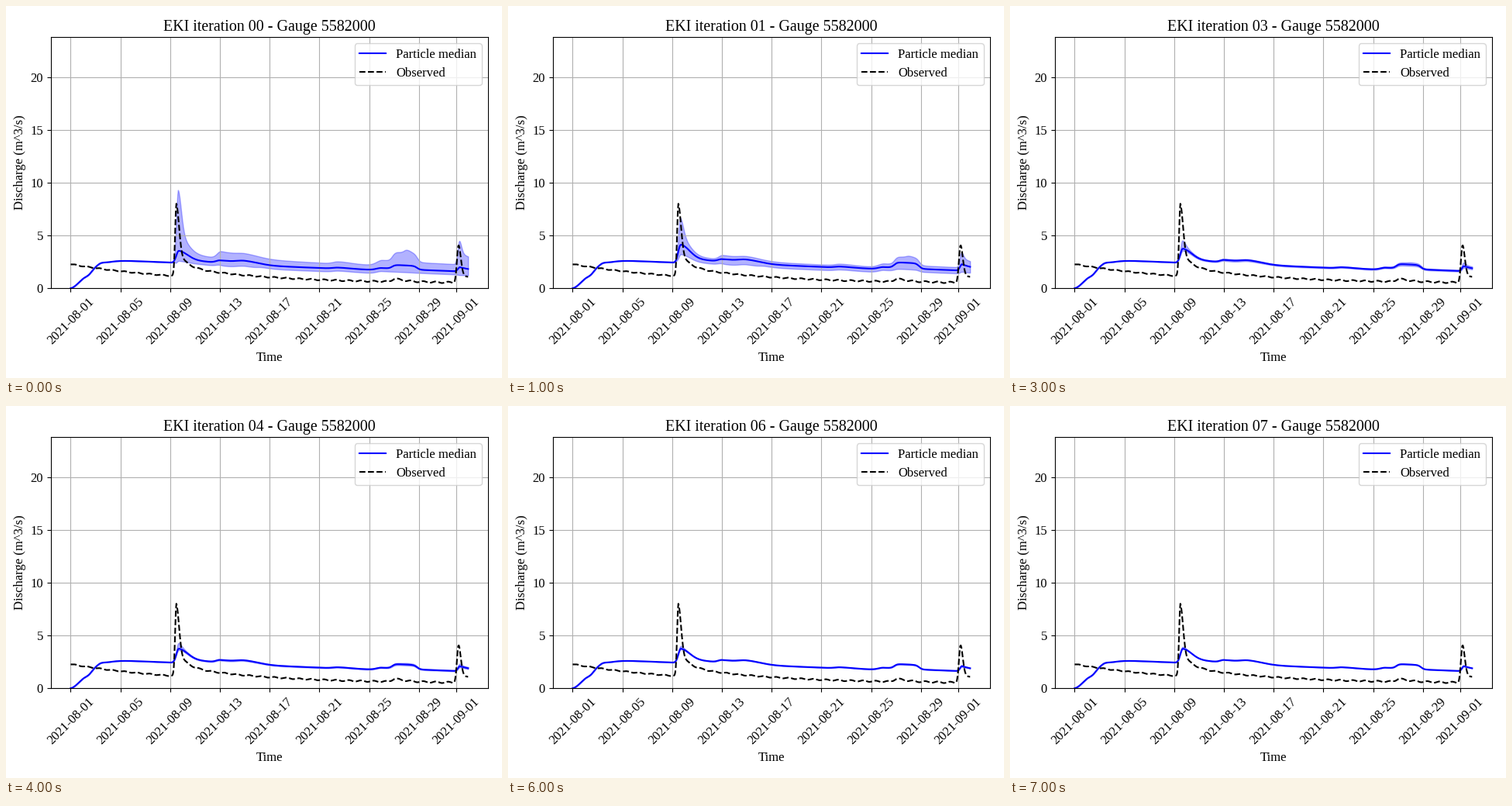
Animation, 640 px wide and 480 px high, one loop 8000 ms. Source, as a matplotlib script:

```python
import numpy as np
import matplotlib.pyplot as plt
from matplotlib.animation import FuncAnimation

plt.rcParams.update({"font.family": "Liberation Serif", "font.size": 12})

W, H, DPI = 640, 480, 100
LEFT, RIGHT, TOP, BOTTOM = 57.8, 621.9, 39.9, 364.1
STEPS = 8

t = np.arange(32 * 24) / 24  # hourly, in days


def bump(peak, rise, fall):
    """Bell with its own width on each side."""
    d = t - peak
    return np.exp(-0.5 * (d / np.where(d < 0, rise, fall)) ** 2)


def surge(peak, rise, decay):
    """Bell-shaped rise, exponential recession."""
    d = t - peak
    return np.where(d < 0, bump(peak, rise, 1), np.exp(-np.maximum(d, 0) / decay))


def plateau(start, end, width):
    return (np.tanh((t - start) / width) - np.tanh((t - end) / width)) / 2


# Events shared by the median and its band.
onset = plateau(8.4, 99, 0.08)
flood = bump(8.7, 0.2, 0.7)
shower = bump(21.5, 0.4, 1)
swell = plateau(25.85, 27.85, 0.25)
second = surge(31.3, 0.15, 1.5)

observed = (
    0.45 + 1.83 * np.exp(-t / 8.8)
    + (0.04 + 0.001 * t) * np.cos(2 * np.pi * (t - 0.36))
    + 0.93 * surge(8.5, 0.1, 6.6)
    + 4.2 * bump(8.5, 0.1, 0.22) + 1.7 * surge(8.5, 0.1, 0.7)
    + 0.3 * surge(26.1, 0.25, 1)
    + 2.7 * bump(31.19, 0.13, 0.17) + 0.8 * surge(31.19, 0.13, 3)
)

spin_up = 1 - np.exp(-(t / 1.75) ** 1.6)
median = (
    2.87 * np.exp(-t / 48) * spin_up
    - 0.2 * bump(1.45, 0.25, 0.25) + 0.15 * bump(2.4, 0.3, 0.3)
    + 0.75 * flood + 0.4 * surge(8.7, 0.2, 4)
    + 0.22 * bump(12, 0.3, 1) + 0.32 * bump(14, 0.7, 1.1)
    + 0.1 * shower
    + 0.2 * surge(25, 0.4, 8) + 0.36 * swell
    + 0.4 * second
)
lift = 0.15 * onset * np.exp(-t / 50) + 0.45 * flood + 0.16 * swell + 0.2 * second

above = (
    0.45 * onset
    + 3.3 * bump(8.63, 0.13, 0.25) + 2.1 * surge(8.63, 0.13, 0.65)
    + 0.42 * surge(12.1, 0.3, 4) + 0.1 * shower
    + 0.3 * surge(25.1, 0.5, 20) + 0.5 * swell + 0.25 * bump(27, 0.2, 0.3)
    + 1.1 * bump(31.24, 0.13, 0.17) + 0.75 * surge(31.24, 0.13, 2)
)
below = (
    0.3 * onset + 0.65 * flood + 0.2 * plateau(11.85, 15, 0.4)
    + 0.35 * swell + 0.45 * second
)


def weights(k):
    """Median lift, upper spread and lower spread after k updates."""
    if k < 3:
        return [(0, 1, 1), (1, 0.45, 0.95), (0.18, 0.4, 0.7)][k]
    shrink = 0.7 ** (k - 3)
    return 0.35, 0.14 * shrink, 0.2 * shrink


def curves(k):
    up, high, low = weights(k)
    mid = median + up * lift
    return mid, mid - low * below, mid + high * above


fig, ax = plt.subplots(figsize=(W / DPI, H / DPI), dpi=DPI)
fig.subplots_adjust(left=LEFT / W, right=RIGHT / W,
                    bottom=1 - BOTTOM / H, top=1 - TOP / H)
mid, low, high = curves(0)
band = ax.fill_between(t, low, high, color="blue", alpha=0.3)
line, = ax.plot(t, mid, color="blue", label="Particle median")
ax.plot(t, observed, "k--", label="Observed")

margin = 0.05 * t[-1]
ax.set_xlim(-margin, t[-1] + margin)
ax.set_ylim(0, 23.82)
ax.set_yticks(range(0, 21, 5))
ticks = [*range(0, 29, 4), 31]
ax.set_xticks(ticks, [f"2021-08-{d + 1:02}" for d in ticks[:-1]] + ["2021-09-01"],
              rotation=45)
ax.set_xlabel("Time")
ax.set_ylabel("Discharge (m^3/s)")
ax.grid(True)
ax.legend(loc="upper right")
title = ax.set_title("")


def update(k):
    mid, low, high = curves(k)
    line.set_ydata(mid)
    band.set_verts([np.column_stack([np.r_[t, t[::-1]], np.r_[low, high[::-1]]])])
    title.set_text(f"EKI iteration {k:02} - Gauge 5582000")
    return line, band, title


anim = FuncAnimation(fig, update, frames=STEPS, interval=1000,
                     repeat=True, repeat_delay=0)
plt.show()
```
